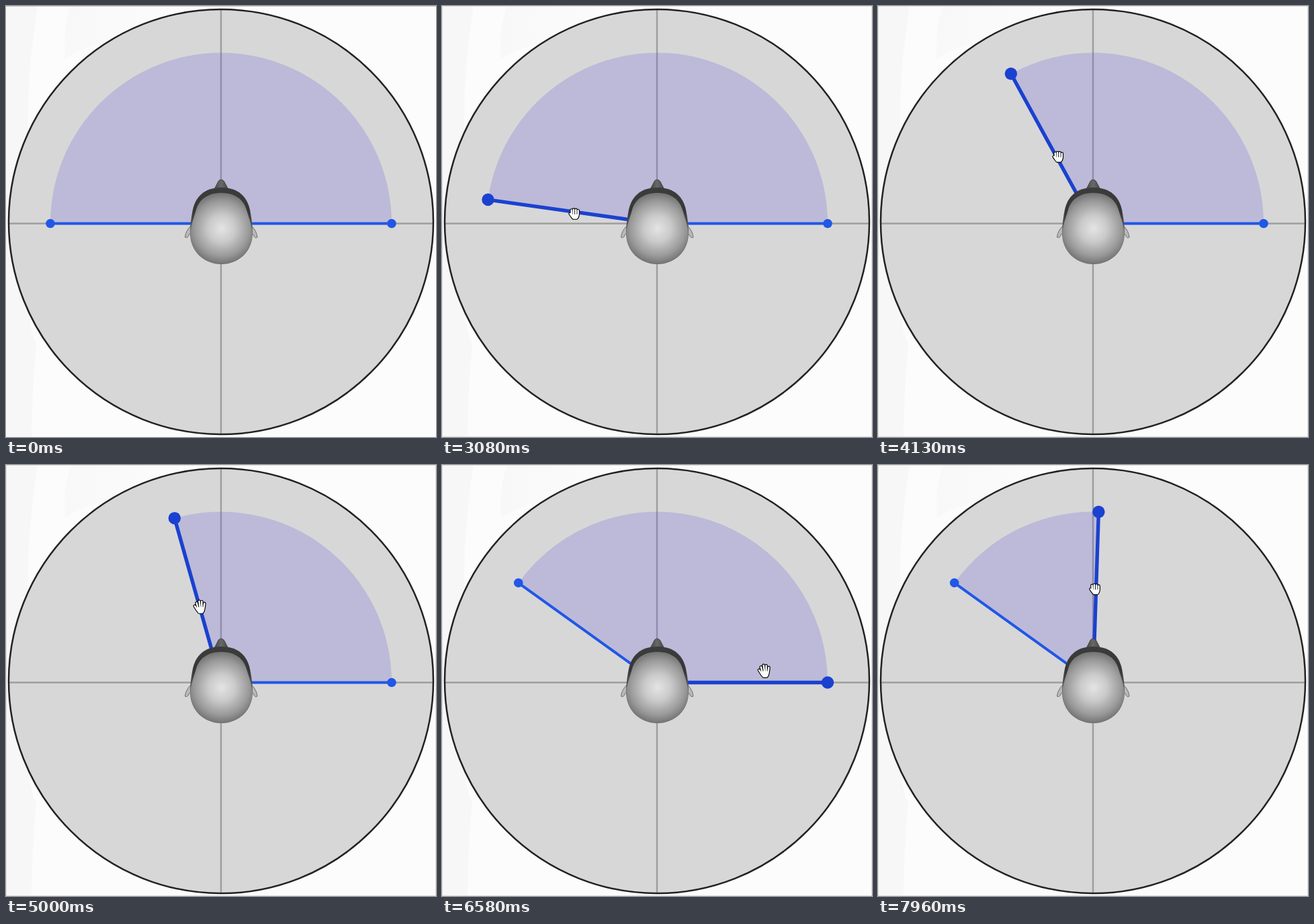
These frames come from a looping animation (640 by 641 pixels, 8 s). An HTML page:

```html
<!DOCTYPE html>
<html lang="en">
<head>
<meta charset="utf-8">
<title>Field of view</title>
<style>
  html, body { margin: 0; width: 100%; height: 100%; overflow: hidden; background: #fcfcfc; }
  svg { display: block; width: 100%; height: 100%; }
  .arm { stroke: #2057e6; fill: #2057e6; stroke-width: 4; }
  .arm.hover { stroke: #1a41cf; fill: #1a41cf; stroke-width: 5.4; }
  .arm circle { stroke: none; r: 6.8px; }
  .arm.hover circle { r: 9.2px; }
  .hand { stroke-linecap: round; stroke-linejoin: round; }
  .hand .edge { stroke: #000; stroke-width: 4.8; fill: #000; }
  .hand .skin { stroke: #fff; stroke-width: 2.5; fill: none; }
</style>
</head>
<body>
<svg viewBox="0 0 640 641" preserveAspectRatio="none">
  <defs>
    <linearGradient id="fade" x1="90" x2="250" y1="0" y2="0" gradientUnits="userSpaceOnUse">
      <stop stop-color="#f8f8f8"/><stop offset="1" stop-color="#fcfcfc"/>
    </linearGradient>
    <radialGradient id="skull" cx="321" cy="331" r="57" gradientUnits="userSpaceOnUse">
      <stop stop-color="#e4e4e4"/><stop offset=".35" stop-color="#cacaca"/>
      <stop offset=".72" stop-color="#999"/><stop offset="1" stop-color="#666"/>
    </radialGradient>
    <linearGradient id="face" x1="0" x2="0" y1="270" y2="340" gradientUnits="userSpaceOnUse">
      <stop stop-color="#3c3c3c"/><stop offset=".5" stop-color="#363636"/><stop offset="1" stop-color="#6a6a6a"/>
    </linearGradient>
    <linearGradient id="nose">
      <stop stop-color="#444"/><stop offset=".5" stop-color="#686868"/><stop offset="1" stop-color="#444"/>
    </linearGradient>
    <path id="openShape" d="M-8-1L-3.5 6M-5.2-5.5L-3 3M-1.4-8L-.2 1M2.4-7.6L2.6 1M6.4-4.8L5.4 3M-3.5 2L5.5 2L4.5 6.5L3 8.5H-1.5L-3.5 5.5Z"/>
    <path id="fistShape" d="M-6.3 1L-3.5 5M-4.4-4.3L-4 1M-1.1-5.2V1M2.3-4.9V1M5.6-3.6V2M-4 3H5.5L4.5 6L3.5 7.5H-1.5L-3.5 5Z"/>
  </defs>

  <path d="M0 0H47C39 55 33 105 33 165V440Q34 480 45 503Q39 560 38 641H0Z" fill="#f7f7f7"/>
  <path d="M97 0Q84 35 88 78Q135 48 250 40V0Z" fill="url(#fade)"/>
  <path d="M0 .5H640" stroke="#c6c6c6"/>
  <rect id="border" x=".5" y=".5" width="639" height="640" fill="none" stroke="#dedede"/>

  <circle cx="320" cy="321" r="316" fill="#d7d7d7"/>
  <path d="M4 323.5H636M320 5V637" stroke="#9e9e9e" stroke-width="2.5"/>
  <circle cx="320" cy="321" r="316" fill="none" stroke="#222" stroke-width="2.5"/>
  <path id="sector" fill="rgb(80,70,220)" fill-opacity=".2"/>
  <g id="left" class="arm"><line x1="320" y1="323.5"/><circle/></g>
  <g id="right" class="arm"><line x1="320" y1="323.5"/><circle/></g>

  <g stroke="#6f6f6f" stroke-width="1" fill="#b8b8b8">
    <path id="ear" d="M275 327Q267 335 266.500 344Q270 346 272 341L276 336Z"/>
    <use href="#ear" transform="matrix(-1 0 0 1 640.500 0)"/>
  </g>
  <path d="M309 274Q314 265 316 260.500Q320 256 324.500 260.500Q327 265 331.500 274Z" fill="url(#nose)" stroke="#3c3c3c" stroke-width=".8"/>
  <path d="M320.500 270C346 270 359 284 363 303C366 318 367 328 367 338C367 365 346 384 320.500 384C295 384 274 365 274 338C274 328 275 318 278 303C282 284 295 270 320.500 270Z" fill="url(#face)"/>
  <path d="M320.500 278C339 278 353 286 358 303C362 317 366.500 328 366.500 338C366.500 365 346 383.500 320.500 383.500C295 383.500 274.500 365 274.500 338C274.500 328 279 317 283 303C288 286 302 278 320.500 278Z" fill="url(#skull)"/>

  <path id="arrow" d="M0 0V17L4 13.300L7 20.500L10 19.200L7 12.200H12.500Z" stroke="#fff" stroke-width="1.3"/>
  <g id="open" class="hand"><use href="#openShape" class="edge"/><use href="#openShape" class="skin" style="fill:#fff"/></g>
  <g id="fist" class="hand"><use href="#fistShape" class="edge"/><use href="#fistShape" class="skin" style="fill:#fff"/></g>
</svg>
<script>
const LOOP = 8000, CX = 320, CY = 323.5, RADIUS = 254;
const el = id => document.getElementById(id);

// Keys are [ms, value, ...]
const leftAngle = [[2600, 0], [3080, 8], [3330, 13], [4130, 61.2], [4170, 63.8], [4520, 74.2],
  [5080, 74.2], [5830, 43.5], [6150, 35.7]];
const rightAngle = [[6730, 0], [7500, 38.7], [7960, 88], [8200, 113]];
const approach = [[1230, 646, 86], [1450, 455, 158], [1690, 267, 243], [1900, 267, 243], [2430, 197, 315], [2600, 197, 319]];
const crossing = [[6200, 227, 256], [6540, 480, 306], [6650, 480, 306]];
// Hand position relative to the held arm: angle offset, distance from centre
const leftGrip = [[2600, 2, 123], [3080, -.8, 124], [4130, 1.4, 113], [5000, .4, 117], [6200, 0, 115]];
const rightGrip = [[6650, 6.2, 161], [7960, .7, 140], [8200, .7, 140]];

// Monotone cubic interpolation of every value in a track
function sample(keys, t) {
  const last = keys.length - 1;
  if (t <= keys[0][0]) return keys[0].slice(1);
  if (t >= keys[last][0]) return keys[last].slice(1);
  const i = keys.findIndex(k => k[0] > t) - 1;
  const span = keys[i + 1][0] - keys[i][0], u = (t - keys[i][0]) / span;
  const secant = (j, c) => (keys[j + 1][c] - keys[j][c]) / (keys[j + 1][0] - keys[j][0]);
  const slope = (j, c) => {
    if (j === 0 || j === last) return 0;
    const a = secant(j - 1, c), b = secant(j, c);
    return a * b > 0 ? 2 * a * b / (a + b) : 0;
  };
  return keys[i].slice(1).map((from, n) => {
    const c = n + 1, to = keys[i + 1][c], s = u * u * (3 - 2 * u);
    return from + (to - from) * s
      + span * u * (1 - u) * ((1 - u) * slope(i, c) - u * slope(i + 1, c));
  });
}

// side: -1 left, 1 right; degrees are measured up from the horizontal
function polar(side, degrees, r) {
  const a = degrees * Math.PI / 180;
  return [CX + side * r * Math.cos(a), CY - r * Math.sin(a)];
}

function drawArm(id, [x, y], hover) {
  const arm = el(id), [line, dot] = arm.children;
  arm.classList.toggle('hover', hover);
  line.setAttribute('x2', x);
  line.setAttribute('y2', y);
  dot.setAttribute('cx', x);
  dot.setAttribute('cy', y);
}

function cursorAt(t, left, right) {
  if (t < 2600) return sample(approach, t);
  if (t >= 6200 && t < 6650) return sample(crossing, t);
  const [side, angle, grip] = t < 6200 ? [-1, left, leftGrip] : [1, right, rightGrip];
  const [offset, r] = sample(grip, t);
  return polar(side, angle + offset, r);
}

function draw(t) {
  const between = (a, b) => t >= a && t < b;
  const [left] = sample(leftAngle, t), [right] = sample(rightAngle, t);
  const a = polar(-1, left, RADIUS), b = polar(1, right, RADIUS);
  const onLeft = between(2430, 6260), onRight = t >= 6480;
  drawArm('left', a, onLeft);
  drawArm('right', b, onRight);
  el('sector').setAttribute('d', `M${CX} ${CY}L${a}A${RADIUS} ${RADIUS} 0 0 1 ${b}Z`);
  el('border').style.display = t >= 2430 ? '' : 'none';

  const held = between(2580, 4800) || between(5120, 6200) || t >= 6690;
  const shape = t < 1230 ? '' : held ? 'fist' : onLeft || onRight ? 'open' : 'arrow';
  const [x, y] = cursorAt(t, left, right);
  for (const id of ['arrow', 'open', 'fist']) {
    el(id).style.display = id === shape ? '' : 'none';
    el(id).setAttribute('transform', `translate(${x} ${y})`);
  }
}

const start = performance.now();
function tick() {
  draw((performance.now() - start) % LOOP);
  requestAnimationFrame(tick);
}
tick();
</script>
</body>
</html>
```
